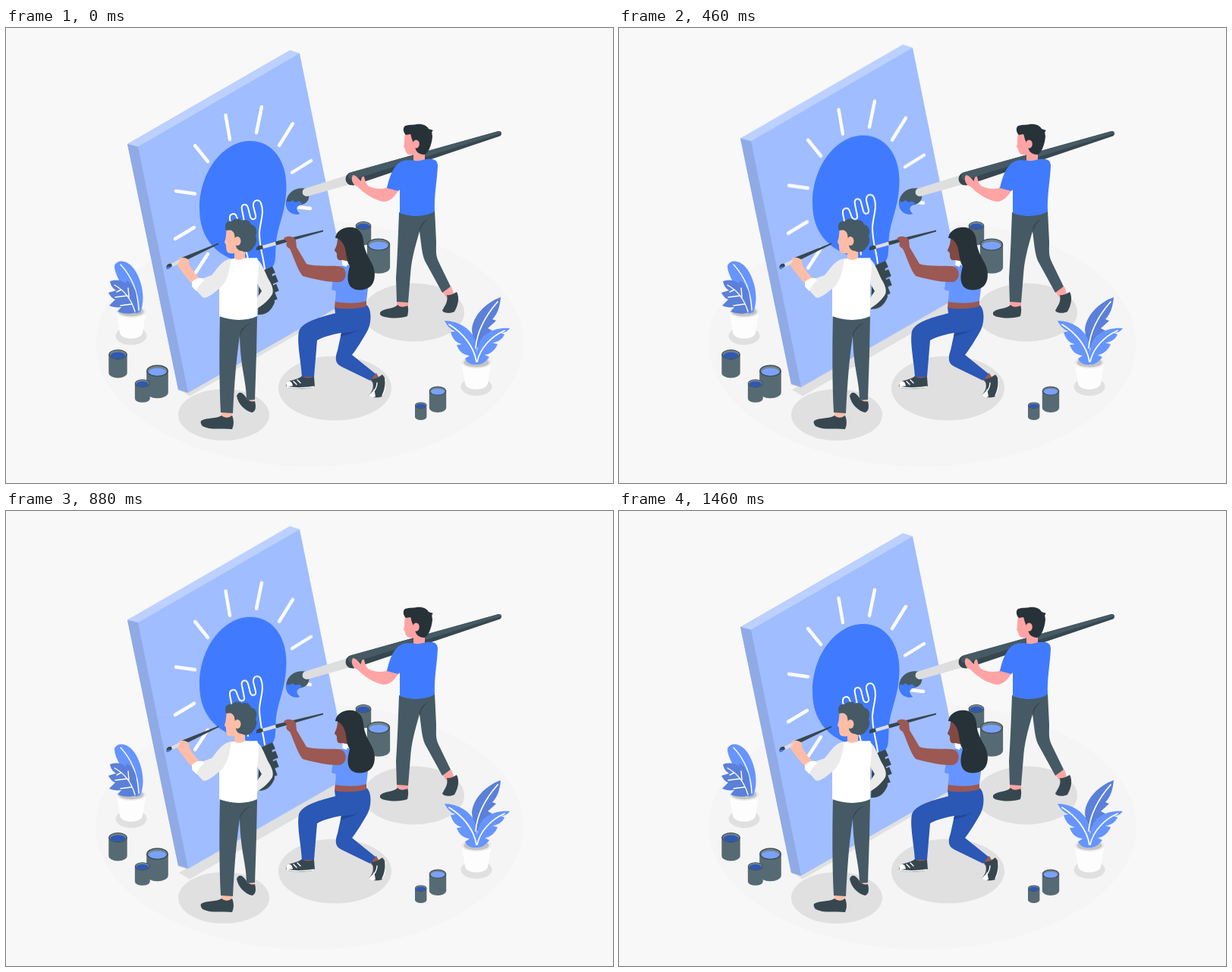
Animation, 800 px wide and 600 px high, one loop 1500 ms. Source, as an HTML page without scripts:

```html
<!DOCTYPE html>
<html lang="en">
<head>
<meta charset="utf-8">
<title>Painting an idea</title>
<style>
  html, body { margin: 0; width: 100%; height: 100%; overflow: hidden; background: #f8f8f8; }
  svg { display: block; width: 100%; height: 100%; }
  .board { animation: float 1.5s linear -20ms infinite; }
  @keyframes float {
    0%, 100% { transform: translateY(.3px); }
    50% { transform: translateY(-11.7px); }
  }
  .shade { fill: #e0e0e0; }
  .blue { fill: #407bff; }
  .slate { fill: #455a64; }
  .dark { fill: #37474f; }
  .ink { fill: #263238; }
  .white { fill: #fff; }
  .sleeve { fill: #ebebeb; }
  .ferrule { fill: #dedede; }
  .pink { fill: #ffa4a4; }
  .peach { fill: #ffbda7; }
  .brown { fill: #9c5853; }
  .leaf { fill: #6695ff; }
  .leaf2 { fill: #5b80d9; }
  .line { fill: none; stroke: #fff; stroke-width: 1.4; stroke-linecap: round; stroke-linejoin: round; }
  .rays { stroke-width: 4.4; }
  .wire { stroke-width: 2; }
  .screw { fill: none; stroke: #37474f; stroke-width: 9.5; }
  .deep { color: #2d58b5; }
  .pale { color: #79a2ff; }
</style>
</head>
<body>
<svg viewBox="0 0 800 600" xmlns="http://www.w3.org/2000/svg">
  <defs>
    <g id="can">
      <path d="M-14 0V28A14 7.500 0 0 0 14 28V0Z" fill="#566a73"/>
      <ellipse rx="14" ry="7.500" class="dark"/>
      <ellipse rx="12.700" ry="6.400" fill="#72828a"/>
      <ellipse cy="1.400" rx="11.300" ry="4.900" fill="currentColor"/>
    </g>
    <g id="pot">
      <ellipse cy="32" rx="20.500" ry="12" class="shade"/>
      <path d="M-19.500 0L-15 28C-13 38 13 38 15 28L19.500 0Z" fill="#fdfdfd"/>
      <ellipse rx="19.500" ry="8" fill="#ebebeb"/>
      <ellipse rx="16.500" ry="6.200" fill="#c4c4c4"/>
    </g>
  </defs>

  <!-- floor -->
  <ellipse cx="400" cy="416" rx="282" ry="162" fill="#f5f5f5"/>
  <g class="shade">
    <ellipse cx="287" cy="510" rx="60" ry="34"/>
    <ellipse cx="433.500" cy="475" rx="74.500" ry="42.500"/>
    <ellipse cx="537" cy="375" rx="67" ry="38.500"/>
    <path d="M228 477L242 485.500 455 363 440 355Z"/>
  </g>

  <!-- canvas with the bulb -->
  <g class="board">
    <path d="M160 153L374 29.500 387 33.500 453 359 240 481 227 477Z" fill="#a0bdff"/>
    <path d="M160 153L374 29.500 387 33.500 174 156.500Z" fill="#bcd1ff"/>
    <path d="M160 153L174 156.500 240 481 227 477Z" fill="#90aae6"/>
    <path class="blue" d="M322 149C352 149 369.500 176 369.500 208C369.500 246 356 262 355.500 290C355 304 355 309 352 314L338 320 300 306C276 296 255 277 255 238C255 190 286 149 322 149Z"/>
    <path class="line rays" d="M289.500 115L295 147M337 104L330 138M378 126L360 155M402 175L377 190.500M249 155L266 176M224 215L249 218.500M223 278L248 263M266 298L249 324M384 236L401 238"/>
    <path class="line wire" d="M319 306C318 285 299 278 297 262L295 252C294 244 302 243 304 249L307 257C309 261 315 260 314 255L311 240C309 232 317 230 319 237L322 249C324 254 330 253 329 247L326 235C325 226 334 225 336 231C341 243 335 255 334 270C334 290 339 300 341 318"/>
    <path class="screw" d="M336 326L353 318.500M338 338L357 330M338 350L358 342M336 361L356 353"/>
    <path class="dark" d="M334 324L350 318 354 362C350 373 342 379 332 378Z"/>
  </g>

  <!-- paint cans -->
  <use href="#can" class="deep" transform="translate(471 260.500) scale(.73)"/>
  <use href="#can" class="pale" transform="translate(491 285.500) scale(1.080)"/>
  <use href="#can" class="deep" transform="translate(147.500 430.500) scale(.87)"/>
  <use href="#can" class="pale" transform="translate(199.500 452) scale(1.020)"/>
  <use href="#can" class="deep" transform="translate(179.800 468.500) scale(.71)"/>
  <use href="#can" class="deep" transform="translate(546.700 497.500) scale(.55)"/>
  <use href="#can" class="pale" transform="translate(569 478.500) scale(.8)"/>

  <!-- plants -->
  <use href="#pot" x="165" y="374"/>
  <path class="leaf" d="M171 377C163 352 142 328 143 313C147 304 161 306 169 318C180 334 184 358 177 375Z"/>
  <path class="line" d="M151 312C166 328 174 348 175 372"/>
  <path class="leaf2" d="M137 334C147 331 154 333 158 337L159 333C167 336 172 347 172 355L174 374C166 378 155 377 147 374L152 368C146 369 140 368 136 366L144 358C140 357 137 353 135 349L145 346C140 343 138 339 137 334Z"/>
  <path class="line" d="M143 339C156 346 165 357 170 374M152 345L146 348M160 353L144 355M166 364L151 366M162 355L161 343"/>
  <use href="#pot" x="620" y="441"/>
  <path class="leaf2" d="M652 355C632 362 615 380 614 398L617 425 625 419 634 409 629 407 641 399 635 396 646 386 641 384C648 377 651 367 652 355Z"/>
  <path class="leaf" d="M578 386C596 386 616 397 620 417L622 443C614 446 607 441 605 436L611 432C602 431 597 426 594 418L601 417C592 415 588 408 586 401L592 400C585 397 581 392 578 386Z"/>
  <path class="leaf" d="M664 396C645 394 626 403 622 420L618 443C625 446 633 440 637 434L631 431C639 430 645 424 648 417L641 415C650 414 655 409 657 404L652 402C658 402 662 399 664 396Z"/>
  <path class="line" style="stroke-width:1.700" d="M648 361C633 378 621 398 619 422M584 391C602 402 617 420 620 440M657 399C639 407 625 422 621 440"/>

  <!-- man with the giant brush -->
  <path class="slate" d="M399 213C386 208 370 214 369 231C369 241 377 247 387 245C381 240 382 234 390 233C397 231 400 226 399 220Z"/>
  <path class="blue" d="M369 231C371 226 374 231 376 228C379 225 380 232 384 229C387 227 389 231 391 232C381 234 381 241 387 245C377 248 369 241 369 231Z"/>
  <path class="ferrule" d="M393 212L450 194 454 206 397 222C390 222 389 215 393 212Z"/>
  <path class="dark" d="M454 190.500L649 136C654 136 654 141 651 142.500L458 207.500C445 208 445 193 454 190.500Z"/>
  <path class="slate" d="M454 190.500L649 136C653 136 653 138 652 139L457 200C450 201 449 194 454 190.500Z"/>
  <path class="pink" d="M515 361H530V370H516ZM575 347L587 341 590 350 580 355Z"/>
  <path class="dark" d="M493 375C498 369 511 371 516 365C520 369 525 368 529 366C531 370 530 376 529 380C520 384 497 383 493 378ZM576 371C578 366 583 362 581 352C586 353 590 350 594 348C598 355 596 366 591 374C586 377 575 376 575 372Z"/>
  <path class="slate" d="M518 243C532 249 550 249 565 240L567 282C567 294 566 299 570 308L586 341 575 349 552 307C548 298 547 282 545 268C538 292 534 308 533 325L530 362 515 361 514 330C516 300 517 270 518 243Z"/>
  <path class="dark" d="M545 271C545 262 547 256 557 252C550 257 547 262 545 271Z"/>
  <path class="pink" d="M526 140C524 149 526 151 524 156C524 158 526 158 526 160C527 167 531 167 537 167V176H552V150L535 134Z"/>
  <path class="ink" d="M527 141C523 137 523 131 526 129C532 127 538 128 541 127C549 126 555 129 557 133L563 135C560 137 562 140 562 143C561 155 556 166 551 167C546 167 541 164 540 160L536 149C534 145 534 141 533 140Z"/>
  <ellipse class="pink" cx="540.500" cy="153" rx="4.300" ry="5.500"/>
  <path class="pink" d="M502 209L518 213C513 222 506 229 498 229C485 227 472 218 463 209C457 207 454 200 457 194C462 194 465 200 468 202C468 199 469 195 472 196C473 200 474 205 477 208C484 212 493 213 501 211Z"/>
  <path class="blue" d="M521 176C529 173 536 175 540 175C546 176 551 173 555 173C565 172 569 175 569 182C568 203 564 220 565 242C551 250 531 249 519 244V213L517 215 502 211C505 196 511 181 521 176Z"/>

  <!-- kneeling woman -->
  <path class="ferrule" d="M336 287.500L356 281.500 357 286 337 291.500Z"/>
  <path class="dark" d="M330 293C329 288 333 286 338 287L339 291C336 292 333 293 330 293ZM355 281.500L418 266.500 418 268.500 356 286.500Z"/>
  <path class="brown" d="M391 458H406V464H391ZM479 460L488 455 491 460 482 467Z"/>
  <path class="dark" d="M369 468C374 464 384 464 390 459C395 463 401 461 406 460L407 473C396 477 373 476 369 473ZM481 463C486 463 492 460 496 457C503 464 501 476 496 486C490 488 480 488 478 484C484 479 486 470 481 463Z"/>
  <path class="line" d="M370 473C380 475.500 396 474.500 406 473M500 463C501 473 499 479 496 485M379 466L383 470M384 464L388 468M480 484C485 480 489 475 489 468"/>
  <path class="white" d="M369 468C373 464 377 465 378 472L370 473ZM478 484C482 481 485 478 485 475L487 486C484 488 479 487 478 484Z"/>
  <path fill="#2b57b5" d="M433 368C447 371 463 369 475 365C482 370 482 388 477 398C470 411 461 425 456 431L487 456 480 465 443 447C434 443 433 436 437 425L442 402C430 404 416 408 410 412L406 460H390C389 440 383 415 386 400C390 387 416 381 434 376Z"/>
  <path fill="#234795" d="M441 407C449 405 459 402 466 397C460 401 449 402 442 402Z"/>
  <path class="brown" d="M434 358H475V367C463 371 445 371 433 369Z"/>
  <path class="leaf" d="M444 311L456 314 478 335 475 360C461 364 446 363 434 361L435 347 429 345 431 330Z"/>
  <path class="white" d="M444 305L450 307 449 315 443 313Z"/>
  <path class="brown" d="M366 278C369 273 378 274 382 279L383 289 396 311C408 315 427 313 439 314C451 316 450 333 440 335C424 336 402 330 391 327C384 319 379 301 374 291C369 289 368 284 371 282Z"/>
  <path fill="#824943" d="M437 275C437 286 435 288 433 293C433 295 436 295 436 298C436 304 437 307 443 306L453 308V280Z"/>
  <path class="ink" d="M434 277C435 269 442 264 450 263C462 261 470 268 471 280C472 293 477 301 482 310C488 322 487 335 480 341C472 347 460 347 454 341C448 333 451 322 453 314C448 306 449 296 446 288C443 281 439 277 434 277Z"/>

  <!-- man in the white shirt -->
  <path class="peach" d="M284 505H298V515H284ZM317 489H327V497H318Z"/>
  <path class="dark" d="M257 518C265 513 277 516 284 511C289 515 294 514 298 511C301 518 300 525 298 529C285 527 270 531 259 525C257 523 256 520 257 518ZM304 485C307 478 312 480 317 488C321 493 324 493 328 492C330 500 329 506 324 507C316 505 306 497 304 485Z"/>
  <path class="slate" d="M282 379H331L330 430 328 490 317 491C317 465 309 450 308 406C303 440 301 470 299 508L283 507C281 470 281 420 282 379Z"/>
  <path class="dark" d="M308 408C308 398 314 392 323 389C314 394 310 400 308 408Z"/>
  <path class="sleeve" d="M329 304C337 307 341 322 347 333C351 340 353 346 351 351C346 359 339 365 331 370V356L337 347 330 335Z"/>
  <path class="ferrule" d="M217 311L232 303.500 234 308 219 315Z"/>
  <path class="dark" d="M212 318C210 313 214 310 218 311L219 314C217 315 215 318 212 318ZM231 303L280 283.500 280.500 285 233 308.500Z"/>
  <path class="blue" d="M212 318C211 315 213 314 217 315C215 317 214 318 212 318Z"/>
  <path class="peach" d="M247 339C238 330 231 320 226 313C227 309 231 307 228 304C231 301 235 303 238 304C243 306 240 310 243 315C247 321 251 326 256 331Z"/>
  <path class="white" d="M295 305C307 302 321 304 331 303C335 310 332 325 331 340L331 380C316 387 296 386 281 380V335L285 315Z"/>
  <path class="sleeve" d="M297 304C285 306 281 314 271 326L257 331 250 345 259 355C264 358 272 351 283 342C292 334 295 318 297 304Z"/>
  <path class="white" d="M245 335C249 330 254 329 259 330L261 333C256 337 253 341 251 347L245 341Z"/>
  <path class="peach" d="M291 261C290 273 290 277 288 282C288 284 290 284 290 287C290 296 292 298 301 297V304C305 307 312 306 315 303V274Z"/>
  <path class="slate" d="M290 267C287 259 291 254 297 255C301 251 307 250 311 254C317 251 322 255 323 259C330 261 332 268 329 274C332 280 329 287 326 289C324 295 316 297 311 294C306 294 303 290 303 286L301 272C299 266 295 266 290 267Z"/>
  <ellipse class="peach" cx="305" cy="281" rx="4.500" ry="6"/>
</svg>
</body>
</html>
```
